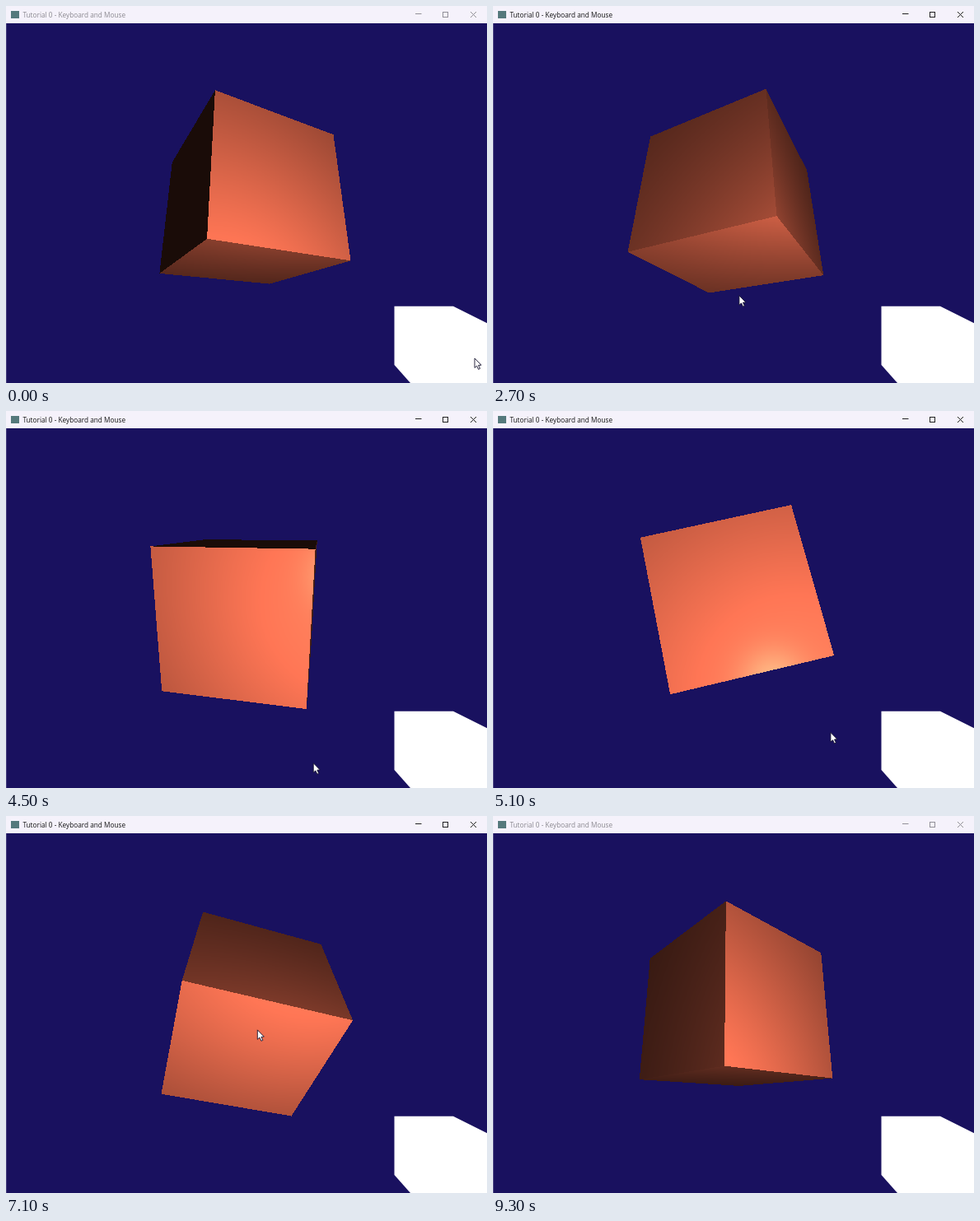
Recreate the animation shown at these times as an HTML page with a canvas. Size 584 by 458 pixels, loop 9400 ms.

```html
<!DOCTYPE html>
<html lang="en">
<head>
<meta charset="utf-8">
<title>Tutorial 0 - Keyboard and Mouse</title>
<style>
  html, body { margin: 0; width: 100%; height: 100%; overflow: hidden; background: #19115f; }
  canvas { display: block; }
</style>
</head>
<body>
<canvas id="stage" width="584" height="458"></canvas>
<script>
const LOOP = 9400, STEP = 100;
const CX = 292.6, CY = 240, FOCAL = 378.4, DIST = 4.85;
const LIGHT = [0.776, -0.58, 3.63];
const COLOR = [255, 118, 85];

const ctx = document.getElementById('stage').getContext('2d');

// The drag: time, pitch and yaw of the cube in radians.
const DRAG = [
  [700, -3.561, -0.490],
  [1800, 0.714, -0.319],
  [2700, -0.563, -2.043],
  [3900, -2.823, -1.015],
  [4600, -2.890, 0.430],
  [5100, -1.746, 1.343],
  [7100, 2.239, -1.848],
  [8600, -3.441, -0.716]
];
const START = DRAG[0][0], END = DRAG[DRAG.length - 1][0];
const mix = (a, b, k) => a + (b - a) * k;

function dragAt(t) {
  t = Math.min(Math.max(t, START), END);
  const i = Math.max(1, DRAG.findIndex(d => d[0] >= t));
  const a = DRAG[i - 1], b = DRAG[i], k = (t - a[0]) / (b[0] - a[0]);
  return { pitch: mix(a[1], b[1], k), yaw: mix(a[2], b[2], k) };
}

// The pointer turns the cube in proportion to its travel.
const TURN = 0.0305;
const pointer = ({ pitch, yaw }) => [365.9 + yaw / TURN, 333.3 - pitch / TURN];

function cursorAt(t) {
  if (t < STEP) return [569, 428];
  if (t < START || t >= 9100) return null;
  const [x, y] = pointer(dragAt(t));
  if (t <= END) return [x, y];
  // After release it swings up and leaves through the bottom edge.
  const k = (t - END) / 500;
  return [x - 40 * k, y + 14 * k - 300 * k * (1 - k)];
}

// World to cube space: undo the pitch, then the yaw.
function toLocal({ pitch, yaw }) {
  const sp = Math.sin(pitch), cp = Math.cos(pitch);
  const sy = Math.sin(yaw), cy = Math.cos(yaw);
  return (x, y, z) => {
    const w = z * cp - y * sp;
    return [x * cy - w * sy, y * cp + z * sp, x * sy + w * cy];
  };
}

const dot = (a, b) => a[0] * b[0] + a[1] * b[1] + a[2] * b[2];
const toward = (from, to) => {
  const v = [to[0] - from[0], to[1] - from[1], to[2] - from[2]];
  const n = Math.sqrt(dot(v, v));
  return [v[0] / n, v[1] / n, v[2] / n];
};

// Phong brightness at distance t along ray d, on the face across the given axis.
function shade(eye, d, t, axis, light) {
  const p = [eye[0] + t * d[0], eye[1] + t * d[1], eye[2] + t * d[2]];
  const l = toward(p, light), v = toward(p, eye);
  const side = d[axis] > 0 ? -1 : 1;
  const cos = side * l[axis];
  const mirror = 2 * cos * side * v[axis] - dot(l, v);
  return 0.1 + Math.max(0, cos) + 0.5 * Math.max(0, mirror) ** 32;
}

const SIZE = 294, LEFT = 146, TOP = 93;
const buffer = document.createElement('canvas');
buffer.width = buffer.height = SIZE;
const bctx = buffer.getContext('2d');
const image = bctx.createImageData(SIZE, SIZE);

function drawCube(pose) {
  const local = toLocal(pose), data = image.data;
  const eye = local(0, 0, DIST), light = local(...LIGHT);
  for (let y = 0, k = 0; y < SIZE; y++)
    for (let x = 0; x < SIZE; x++, k += 4) {
      const d = local(LEFT + x + 0.5 - CX, CY - TOP - y - 0.5, -FOCAL);
      let enter = -Infinity, leave = Infinity, axis = 0;
      for (let i = 0; i < 3; i++) {
        const s = d[i] > 0 ? 1 : -1;
        const near = (-s - eye[i]) / d[i], far = (s - eye[i]) / d[i];
        if (near > enter) { enter = near; axis = i; }
        if (far < leave) leave = far;
      }
      const hit = enter < leave;
      data[k + 3] = hit ? 255 : 0;
      if (!hit) continue;
      const b = shade(eye, d, enter, axis, light);
      for (let c = 0; c < 3; c++) data[k + c] = COLOR[c] * b;
    }
  bctx.putImageData(image, 0, 0);
  ctx.drawImage(buffer, LEFT, TOP);
}

function polygon(points, fill) {
  ctx.beginPath();
  points.forEach(([x, y]) => ctx.lineTo(x, y));
  ctx.closePath();
  ctx.fillStyle = fill;
  ctx.fill();
}

function drawTitleBar(active) {
  ctx.fillStyle = '#f5f2fb';
  ctx.fillRect(0, 0, 584, 21);
  ctx.fillStyle = '#55797c';
  ctx.fillRect(6, 6, 10, 9);
  ctx.fillStyle = active ? '#141414' : '#8b8990';
  ctx.font = '8.25px "Open Sans", "Noto Sans", sans-serif';
  ctx.fillText('Tutorial 0 - Keyboard and Mouse', 20.4, 13.6);

  ctx.strokeStyle = active ? '#222' : '#929098';
  ctx.lineWidth = 1;
  ctx.beginPath();
  ctx.moveTo(497, 9.5); ctx.lineTo(504.5, 9.5);
  ctx.moveTo(564, 7); ctx.lineTo(571, 14);
  ctx.moveTo(571, 7); ctx.lineTo(564, 14);
  ctx.stroke();
  ctx.strokeRect(530.5, 7.5, 6, 6);
}

const ARROW = [[0, 0], [0, 11.5], [2.6, 9.2], [4.6, 13.4], [6.5, 12.5], [4.6, 8.5], [8, 8.2]];

function drawCursor([x, y]) {
  polygon(ARROW.map(([u, v]) => [x + u, y + v]), '#fff');
  ctx.strokeStyle = '#15122e';
  ctx.lineWidth = 0.9;
  ctx.stroke();
}

function draw(t) {
  ctx.fillStyle = '#19115f';
  ctx.fillRect(0, 0, 584, 458);
  drawCube(dragAt(t));
  polygon([[471.5, 364.7], [543, 364.7], [584, 385.3], [584, 458], [491, 458], [471.5, 436]], '#fff');
  ctx.fillStyle = 'rgba(255,255,255,0.2)';
  ctx.fillRect(0, 21, 1, 437);
  drawTitleBar(t >= START && t < 9300);
  const cursor = cursorAt(t);
  if (cursor) drawCursor(cursor);
}

// The last pose stays until the loop restarts.
let shown = -1;
function tick() {
  const t = Math.floor(performance.now() % LOOP / STEP) * STEP;
  if (t !== shown) draw(shown = t);
  requestAnimationFrame(tick);
}
tick();
</script>
</body>
</html>
```
